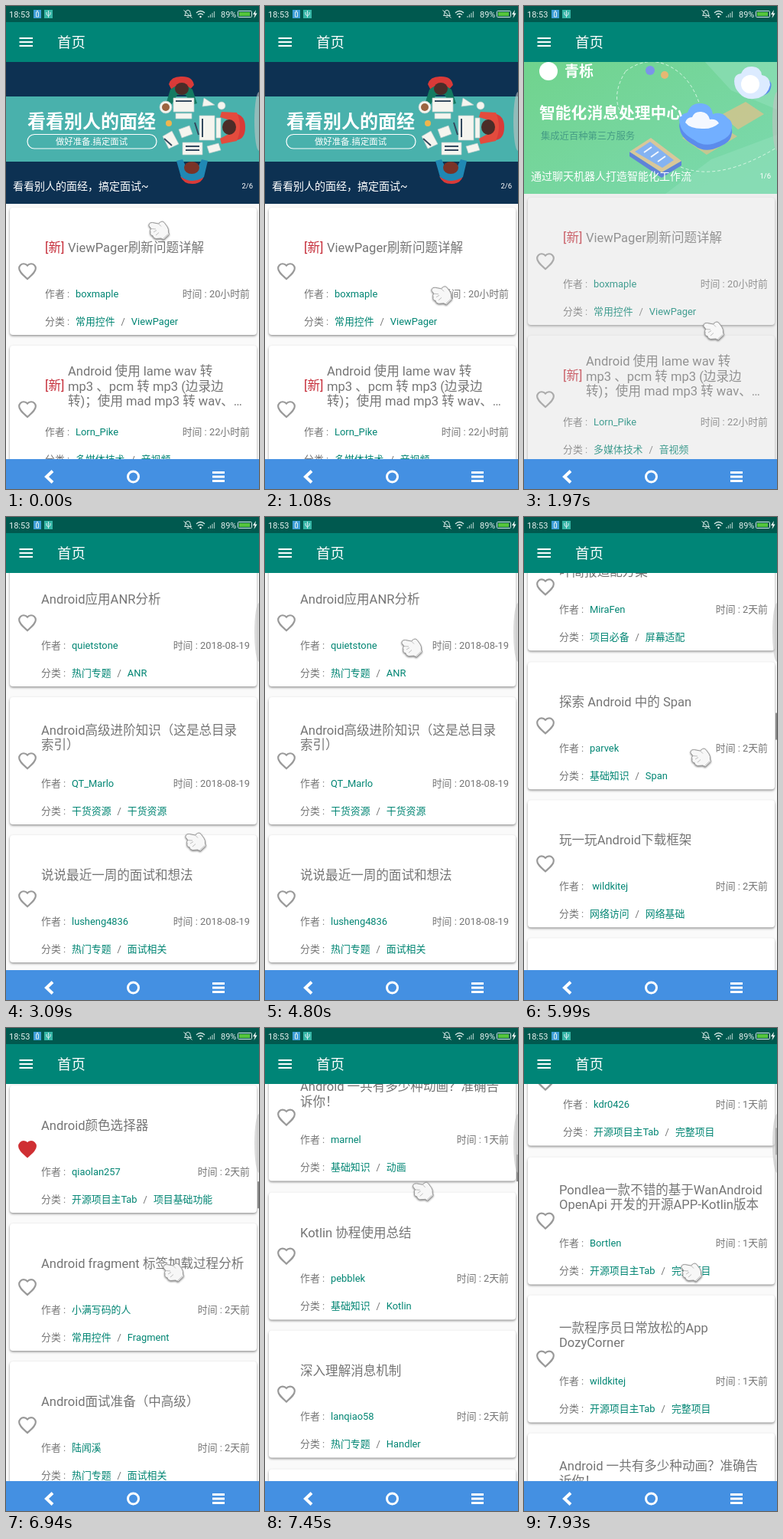
These frames come from a looping animation (331 by 630 pixels, 8000 ms). An HTML page:

```html
<!DOCTYPE html>
<html lang="zh-CN">
<head>
<meta charset="utf-8">
<style>
html, body { margin: 0; width: 100%; height: 100%; overflow: hidden; }
body { position: relative; background: #fafafa; color: #757575; font: 12.88px/20px Roboto, "Noto Sans CJK SC", "Noto Sans CJK", sans-serif; }
svg { display: block; overflow: hidden; }
#stage { position: absolute; width: 331px; height: 630px; overflow: hidden; }
#stage > *, #list > *, .card > * { position: absolute; }
#list { top: 0; left: 0; width: 331px; }
#banner { top: 73px; width: 331px; height: 185px; overflow: hidden; }
#slides { display: flex; width: 662px; }
.card { left: 5px; width: 323px; height: 166px; background: #fff; border-radius: 4px; box-shadow: 0 1.5px 3px rgba(0,0,0,.42); white-space: pre; }
.title { top: 53px; transform: translateY(-50%); font-size: 16.56px; line-height: 19.4px; }
.new { top: 43px; left: 46px; font-size: 16.56px; color: #c62f3b; }
.by { top: 103px; }
.in { top: 139px; }
.time { top: 103px; right: 9px; }
.link { color: #008573; }
.in i { font-style: normal; color: #757575; padding: 0 8px; }
.heart { left: 9.5px; top: 70px; }
#veil { inset: 258px 0 auto; height: 600px; background: rgba(210,210,210,.31); }
#thumb { right: 0; top: 73px; width: 2.5px; height: 35px; background: #8a8a8a; }
#ball { left: 325px; top: 112px; width: 12px; height: 77px; border-radius: 50%; background: rgba(195,195,195,.6); }
#hand { left: -15px; top: -15px; filter: drop-shadow(.5px 1.5px 1px rgba(0,0,0,.5)); }
</style>
</head>
<body>
<div id="stage">
  <div id="list">
    <div id="banner"><div id="slides">
      <svg width="331" height="185">
        <defs><linearGradient id="green" x2="1" y2="1"><stop stop-color="#70d38c"/><stop offset="1" stop-color="#7cd9b0"/></linearGradient></defs>
        <path fill="url(#green)" d="M0 0h331v185H0z"/>
        <path fill="#8fe0b9" d="M185 185l60-45 86-32v77zM225 0h106v75l-60-25z" opacity=".6"/>
        <g fill="none" stroke="#d8f7e4" stroke-dasharray="4 3"><path d="M133 25q30-22 60-5t40 60M128 82q-15-25 5-57M205 150q50 20 125-25"/></g>
        <path fill="#d9c48c" d="M207 112l40-22 32 20-40 24zM258 82l32-17 24 16-34 20z" opacity=".8"/>
        <circle cx="165" cy="24" r="6" fill="#7b94ea"/><circle cx="184" cy="30" r="5" fill="#e6b873"/>
        <path id="cloud" fill="#5b8cec" d="M204 101q-4-12 10-15 4-13 18-12 13 1 15 14 12-4 19 5 9 5 5 17-2 8-14 13-20 10-34-1-17-9-19-21z"/>
        <use href="#cloud" transform="translate(0 -7)" style="filter:brightness(1.25)"/>
        <path fill="#f4f8ff" d="M211 92q2-7 9-7 3-8 12-7 9 1 11 10 9-1 12 5-9 8-22 7-16 0-22-8z"/>
        <use href="#cloud" transform="translate(133 -29) scale(.7)"/>
        <path fill="#dcebff" d="M275 38q0-9 9-10 4-10 15-9 11 1 12 11 11 2 11 13-3 13-15 17-17 4-25-6-7-7-7-16z"/>
        <circle cx="296" cy="42" r="12" fill="#fff"/>
        <path fill="#5f83d8" d="M138 130l42 27 26-15v6l-26 16-42-28z"/>
        <path fill="#d8c79a" d="M138 130l28-18 40 30-26 15z"/>
        <path fill="#84b3f2" d="M145 130l20-13 31 24-15 10z"/>
        <path stroke="#f4f8ff" stroke-width="2" d="M157 131l10-7M166 137l10-7M175 143l10-7"/>
        <circle cx="32" cy="25" r="12" fill="#fff"/>
        <g fill="#fff"><text x="53" y="32" font-size="19" font-weight="700">青栎</text>
        <text x="20" y="87" font-size="20.8" font-weight="700">智能化消息处理中心</text>
        <text x="9" y="167" font-size="14">通过聊天机器人打造智能化工作流</text>
        <text x="323" y="165" font-size="9.5" text-anchor="end">1/6</text></g>
        <text x="22" y="114" font-size="12.3" fill="#459c85">集成近百种第三方服务</text>
      </svg>
      <svg width="331" height="185">
        <path fill="#0d3152" d="M0 0h331v185H0z"/>
        <path fill="#49b1ac" d="M0 45h331v85H0z"/>
        <g id="people">
          <path fill="#d93a38" d="M213 29q3-11 18-10 13 0 15 11l-8 9h-20z"/>
          <path fill="#147a61" d="M215 36q14-12 29 0l6 18-7 2-8-13h-11l-7 12-7-3z"/>
          <ellipse cx="230" cy="35" rx="9" ry="8" fill="#4b2c28"/>
          <path fill="#d93a38" d="M299 67q14 2 14 18t-12 17z"/>
          <path fill="#e34b3d" d="M302 66q8 18 0 37l-20 4-2-7 13-7V76l-13-4 2-7z"/>
          <ellipse cx="292" cy="85" rx="9" ry="10" fill="#4b2c28"/>
          <path fill="#d93a38" d="M228 149q14 10 31 0-3 10-15 10t-16-10z"/>
          <path fill="#2088b4" d="M229 150q15 10 30 0l5-21-8-2-6 13h-13l-6-13-8 2z"/>
          <ellipse cx="243" cy="138" rx="10" ry="8" fill="#7a3328"/>
        </g>
        <g fill="#f5f5ef" stroke="#b9cccb" stroke-width=".7">
          <path d="M219 47h27v18h-27zM222 67h21v7h-21zM253 70h20v32h-20zM275 73h6v26h-6zM231 105h26v16h-26z"/>
          <path d="M205 97l12-7 9 17-13 6zM257 58l2-11 14 9zM226 88l14-5 4 11-14 5zM263 110l15-4 3 9-15 4z"/>
          <circle cx="209" cy="59" r="8"/><circle cx="282" cy="57" r="5"/>
        </g>
        <circle cx="209" cy="59" r="5" fill="#9c6540"/><circle cx="213" cy="80" r="4" fill="#efb54d"/>
        <path fill="none" stroke="#34495e" stroke-width="2" d="M222 51h21M257 74v24M235 110h18M235 115h18M247 79l5 16M207 100l10 9"/>
        <g fill="#fff"><text x="28" y="86" font-size="24" font-weight="700">看看别人的面经</text>
        <text x="112" y="108" font-size="11.4" text-anchor="middle">做好准备.搞定面试</text>
        <text x="9" y="167" font-size="14">看看别人的面经，搞定面试~</text>
        <text x="323" y="165" font-size="9.5" text-anchor="end">2/6</text></g>
        <rect x="28" y="94.5" width="169" height="18.5" rx="9.2" fill="none" stroke="#fff" stroke-width="1.2"/>
      </svg>
    </div></div>
  </div>
  <div id="thumb"></div>
  <div id="ball"></div>
  <svg width="331" height="73" style="top:0;left:0" fill="#fff">
    <path fill="#008577" d="M0 0h331v73H0z"/><path fill="#00594f" d="M0 0h331v21H0z"/>
    <g font-size="11" fill="#e8f1ef"><text x="4" y="15">18:53</text><text x="281" y="15">89%</text></g>
    <path fill="#3f9fd8" d="M36 5h10v11H36z"/><path fill="#35b6a6" d="M50 5h11v11H50z"/>
    <path fill="none" stroke="#d5eaf0" d="M39.5 8h3v6h-3zM40 6.5h2M55.5 6v9M53 8v3l2.5 2 2.5-2V8"/>
    <g fill="none" stroke="#dcebe8"><path d="M233.5 12.500h9q-1.500-1-1.500-4a3 3 0 0 0-6 0q0 3-1.500 4zM232.500 5.500l11 10M236.500 14.500h3"/>
    <path d="M249 9q5.500-5 11 0M251 11.500q3.500-3 7 0" stroke-width="1.3"/></g>
    <circle cx="254.5" cy="14" r="1.2"/>
    <path fill="none" stroke="#9fc5be" stroke-width="1.2" d="M265 15v-2M267.5 15v-4M270 15V9M272.5 15V7"/>
    <rect x="303.5" y="6.5" width="18" height="8" rx="1" fill="none" stroke="#dcebe8"/>
    <path fill="#54c43b" d="M305 8h14v5h-14z"/><path d="M327 5l-4 6h2.500l-1 5 4-6.500H326z"/>
    <path d="M17.5 41h17.500v2H17.500zM17.500 46h17.500v2H17.500zM17.500 51h17.500v2H17.500z"/>
    <text x="67" y="54" font-size="18.4">首页</text>
  </svg>
  <svg width="331" height="39" style="top:591px;left:0" fill="none" stroke="#fff">
    <path fill="#4490e2" stroke="none" d="M0 0h331v39H0z"/>
    <path stroke-width="4" d="M61 15.500l-8 7.500 8 7.500"/>
    <circle cx="166.5" cy="23" r="7" stroke-width="3"/>
    <path stroke-width="3" d="M270 17.500h16M270 23h16M270 28.500h16"/>
  </svg>
  <svg id="hand" width="30" height="30" fill="#f7f7f7" stroke="#989898" stroke-linejoin="round">
    <path d="M2 6q1-3 4.500-2.500l8 1.500 3-2.500q2.500-1.500 4.500 1l4 5.500q2 3 1.500 7l1 3-7.500 7-3-2-7 .5q-4-1-4-4-4-.5-3-4.500-1.500-2.500 1-4.500L3 9Q1.500 8 2 6z"/>
    <path fill="none" stroke="#bdbdbd" d="M5 11.500l6 .5M14.500 5l3.500 3.500M8 16l4-2.500M11 20l4-3.500M20 25l7-6.500"/>
  </svg>
</div>
<script>
const TOP = 263, PITCH = 180.4, LOOP = 8000;
const $ = id => document.getElementById(id);

// index: [title, author, category, time, new, liked]
const posts = {
  0: ['ViewPager刷新问题详解', 'boxmaple', '常用控件/ViewPager', '20小时前', 1],
  1: ['Android 使用 lame wav 转|mp3 、pcm 转 mp3 (边录边|转)；使用 mad mp3 转 wav、…', 'Lorn_Pike', '多媒体技术/音视频', '22小时前', 1],
  3: ['从零搭建一个完整项目', 'kdr0426', '开源项目主Tab/完整项目', '1天前', 1],
  4: ['Pondlea一款不错的基于WanAndroid|OpenApi 开发的开源APP-Kotlin版本', 'Bortlen', '开源项目主Tab/完整项目', '1天前'],
  5: ['一款程序员日常放松的App|DozyCorner', 'wildkitej', '开源项目主Tab/完整项目', '1天前'],
  6: ['Android 一共有多少种动画？准确告|诉你！', 'marnel', '基础知识/动画', '1天前'],
  9: ['Android颜色选择器', 'qiaolan257', '开源项目主Tab/项目基础功能', '2天前', 0, 1],
  10: ['Android fragment 标签加载过程分析', '小满写码的人', '常用控件/Fragment', '2天前'],
  11: ['Android面试准备（中高级）', '陆闻溪', '热门专题/面试相关', '2天前'],
  13: ['一种极低成本的屏幕适配|叶简报适配方案', 'MiraFen', '项目必备/屏幕适配', '2天前'],
  14: ['探索 Android 中的 Span', 'parvek', '基础知识/Span', '2天前'],
  15: ['玩一玩Android下载框架', ' wildkitej', '网络访问/网络基础', '2天前'],
  24: ['Android应用ANR分析', 'quietstone', '热门专题/ANR', '2018-08-19'],
  25: ['Android高级进阶知识（这是总目录|索引）', 'QT_Marlo', '干货资源/干货资源', '2018-08-19'],
  26: ['说说最近一周的面试和想法', 'lusheng4836', '热门专题/面试相关', '2018-08-19']
};
const fillers = [
  ['Android 自定义View入门', 'tovami', '常用控件/自定义View'],
  ['Kotlin 协程使用总结', 'pebblek', '基础知识/Kotlin'],
  ['深入理解消息机制', 'lanqiao58', '热门专题/Handler']
];
const heart = 'M16.5 3c-1.74 0-3.41.81-4.5 2.09C10.91 3.81 9.24 3 7.5 3 4.42 3 2 5.42 2 8.5c0 3.78 3.4 6.86 8.55 11.54L12 21.35l1.45-1.32C18.6 15.36 22 12.28 22 8.5 22 5.42 19.58 3 16.5 3z';

function card(i) {
  const age = i < 7 ? '1天前' : i < 17 ? '2天前' : '2018-08-19';
  const [title, author, kind, time = age, isNew, liked] = posts[i] || fillers[i % 3];
  const x = isNew ? 46 : 41;
  const line = (cls, label, value) =>
    `<div class="${cls}" style="left:${x}px">${label} :</div><div class="${cls} link" style="left:${x + 40}px">${value}</div>`;
  return `<div class="card" style="top:${TOP + i * PITCH}px">
    <svg class="heart" width="26" height="26" viewBox="0 0 24 24" stroke-width="2" fill="${liked ? '#cf2f33' : 'none'}" stroke="${liked ? '#cf2f33' : '#999'}"><path d="${heart}"/></svg>${
    isNew ? '<div class="new">[新]</div>' : ''}<div class="title" style="left:${isNew ? 76 : 41}px">${title.replace(/\|/g, '<br>')}</div>${
    line('by', '作者', author)}<div class="time">时间 : ${time}</div>${
    line('in', '分类', kind.replace('/', '<i>/</i>'))}</div>`;
}
$('list').insertAdjacentHTML('beforeend',
  Array.from({ length: 28 }, (_, i) => card(i)).join('') + '<div id="veil"></div>');

const clamp = v => Math.max(0, Math.min(1, v));
const easeOut = p => 1 - (1 - p) ** 3;
const smooth = p => p * p * (3 - 2 * p);

// keys: [time, ...values]
function track(keys, t, ease) {
  let n = keys.findIndex(k => k[0] > t);
  if (n < 0) n = keys.length;
  const a = keys[Math.max(0, n - 1)], b = keys[n] || a;
  const p = b === a ? 0 : ease(clamp((t - a[0]) / (b[0] - a[0])));
  return a.slice(1).map((v, i) => v + (b[i + 1] - v) * p);
}

const scrollKeys = [[1900, 0], [1965, 13], [2000, 13], [2360, 4538], [4870, 4538], [5590, 3400], [5620, 3400],
  [6410, 2459.5], [6440, 2459.5], [7180, 1789.5], [7330, 1789.5], [7930, 816.6]];
const handKeys = [[110, 200, 294], [1730, 248, 425], [4200, 248, 425], [4470, 192, 172], [4870, 192, 172],
  [5050, 231, 315], [5620, 231, 315], [5690, 204, 190], [5880, 231, 315], [6440, 231, 315],
  [6520, 207, 200], [6740, 219, 320], [7330, 219, 320], [7410, 205, 200], [7600, 219, 320]];

function draw() {
  const t = performance.now() % LOOP;
  const [scroll] = track(scrollKeys, t, easeOut);
  const [x, y] = track(handKeys, t, smooth);
  const slide = easeOut(clamp((t - 1760) / 190));
  $('list').style.transform = `translateY(${-scroll}px)`;
  $('slides').style.transform = `translateX(${331 * (slide - 1)}px)`;
  $('veil').style.opacity = t > 1760 && scroll < 300 ? 1 : 0;
  $('thumb').style.transform = `translateY(${scroll / 14.24}px)`;
  $('thumb').style.opacity = t < 2000 ? 0 : t < 4870 ? 1 - clamp((t - 2700) / 300) : 1;
  $('hand').style.transform = `translate(${x}px,${y}px)`;
  requestAnimationFrame(draw);
}
draw();
</script>
</body>
</html>
```
